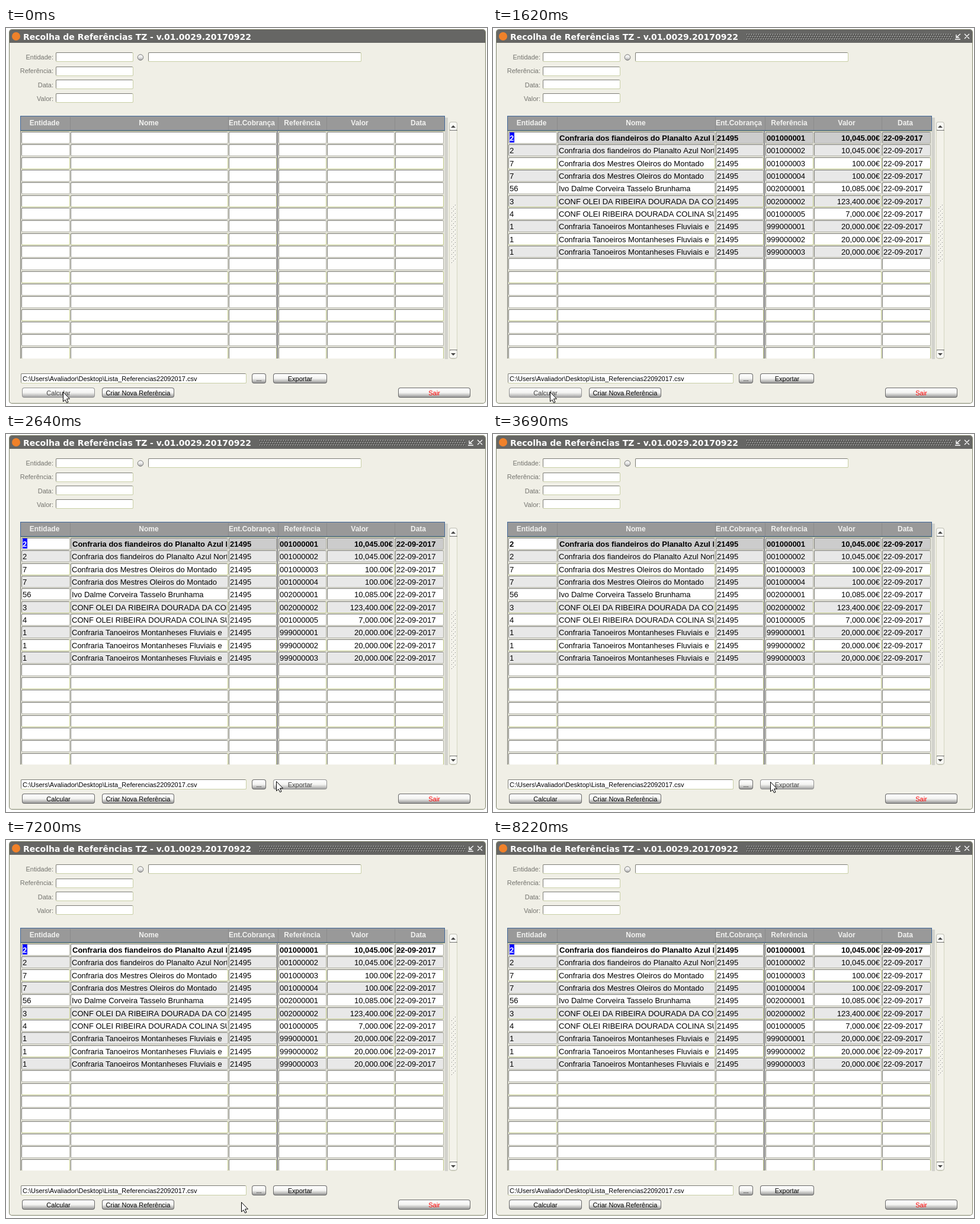
Animation, 812 px wide and 637 px high, one loop 8.5 s. Source, as an HTML page with a canvas:

```html
<!DOCTYPE html>
<html lang="pt">
<head>
<meta charset="utf-8">
<style>
html, body { margin: 0; width: 100%; height: 100%; overflow: hidden; background: #fff; }
canvas { display: block; }
</style>
</head>
<body>
<canvas id="stage" width="812" height="637"></canvas>
<script>
const g = document.getElementById('stage').getContext('2d');
const LOOP = 8500;
const SANS = '"Liberation Sans", Arial, sans-serif';
const SMALL = '11px ' + SANS, CELL = '13px ' + SANS, BOLD = 'bold 13px ' + SANS;
const TITLE = 'bold 14px "DejaVu Sans", Verdana, sans-serif';
const BG = '#f0efe6';

// left, width, heading, heading centre
const cols = [
  [26, 82, 'Entidade', 65], [109, 266, 'Nome', 241], [376, 81, 'Ent.Cobrança', 415],
  [460, 81, 'Referência', 500], [542, 114, 'Valor', 597], [657, 82, 'Data', 696]
];
const weavers = 'Confraria dos fiandeiros do Planalto Azul Norte';
const potters = 'Confraria dos Mestres Oleiros do Montado';
const coopers = 'Confraria Tanoeiros Montanheses Fluviais e';
const rows = [
  ['2', weavers, '001000001', '10,045.00€'],
  ['2', weavers, '001000002', '10,045.00€'],
  ['7', potters, '001000003', '100.00€'],
  ['7', potters, '001000004', '100.00€'],
  ['56', 'Ivo Dalme Corveira Tasselo Brunhama', '002000001', '10,085.00€'],
  ['3', 'CONF OLEI DA RIBEIRA DOURADA DA COLINA', '002000002', '123,400.00€'],
  ['4', 'CONF OLEI RIBEIRA DOURADA COLINA SUL E', '001000005', '7,000.00€'],
  ['1', coopers, '999000001', '20,000.00€'],
  ['1', coopers, '999000002', '20,000.00€'],
  ['1', coopers, '999000003', '20,000.00€']
].map(([id, name, ref, value]) => [id, name, '21495', ref, value, '22-09-2017']);

// start time, x, y of the pointer
const pointer = [
  [0, 96, 613], [2120, 113, 611], [2390, 335, 580], [2640, 456, 585],
  [2910, 468, 584], [3410, 468, 587], [3690, 468, 586], [3960, 468, 590],
  [7200, 397, 610], [7450, 378, 613], [7970, 530, 603], [8220]
];

function rect(x, y, w, h, color) {
  g.fillStyle = color;
  g.fillRect(x, y, w, h);
}

function round(x, y, w, h, r, color) {
  g.fillStyle = color;
  g.beginPath();
  g.roundRect(x, y, w, h, r);
  g.fill();
}

function shade(y, h, ...colors) {
  const fill = g.createLinearGradient(0, y, 0, y + h);
  colors.forEach((c, i) => fill.addColorStop(i / (colors.length - 1), c));
  return fill;
}

function text(s, x, y, font, color = '#000', align = 'left') {
  g.font = font;
  g.fillStyle = color;
  g.textAlign = align;
  g.fillText(s, x, y);
}

function poly(points, fill, stroke) {
  g.beginPath();
  points.forEach(([x, y]) => g.lineTo(x, y));
  g.closePath();
  g.fillStyle = fill;
  g.fill();
  if (stroke) {
    g.strokeStyle = stroke;
    g.stroke();
  }
}

function lines(color, width, ...paths) {
  g.strokeStyle = color;
  g.lineWidth = width;
  g.beginPath();
  for (const [start, ...rest] of paths) {
    g.moveTo(...start);
    rest.forEach(p => g.lineTo(...p));
  }
  g.stroke();
  g.lineWidth = 1;
}

// sunken box: dark top and left edges, pale right and bottom edges
function sunken(x, y, w, h, color, pale) {
  round(x, y, w, h, 2, pale);
  round(x, y, w - 1, h - 1, 2, '#7c7c76');
  round(x + 1, y + 1, w - 2, h - 2, 1, color);
}

function button(x, y, w, label, hover, color = '#000') {
  round(x, y, w, 17, 4, hover ? '#929292' : '#686868');
  round(x + 1, y + 1, w - 2, 15, 3, shade(y, 17, '#fff', '#f4f4f2', hover ? '#989898' : '#8a8a8a'));
  text(label, x + w / 2, y + 13, SMALL, hover ? '#444' : color, 'center');
}

function drawWindow(active) {
  rect(0, 0, 812, 637, '#fff');
  round(5, 2, 805, 631, 5, '#7d8168');
  round(6, 3, 803, 629, 4, BG);
  round(6, 3, 803, 22, [4, 4, 0, 0], '#666664');
  g.fillStyle = '#f0812a';
  g.beginPath();
  g.arc(17, 14, 7, 0, 7);
  g.fill();
  text('Recolha de Referências TZ', 29, 20, TITLE, '#fff');
  text('- v.01.0029.20170922', 243, 20, TITLE, '#fff');
  if (!active) return;
  for (let r = 0; r < 3; r++)
    for (let x = 428 + r % 2 * 2; x < 776; x += 4) {
      rect(x + 1, 11 + r * 4, 1, 1, '#222');
      rect(x, 10 + r * 4, 1, 1, '#eee');
    }
  lines('#fff', 1.3,
    [[789, 10], [782, 16]], [[782, 11], [782, 16], [787, 16]], [[780, 19], [789, 19]],
    [[796, 10], [804, 18]], [[804, 10], [796, 18]]);
}

function drawForm() {
  [['Entidade:', 41, 53], ['Referência:', 65, 76], ['Data:', 87, 100], ['Valor:', 110, 123]].forEach(([s, y, base]) => {
    text(s, 80, base, SMALL, '#74746f', 'right');
    sunken(84, y, 131, 16, '#fff', '#c9cfa6');
  });
  sunken(240, 41, 360, 16, '#fff', '#c9cfa6');
  g.fillStyle = shade(44, 11, '#fff', '#e8e8e8', '#999');
  g.strokeStyle = '#777';
  g.beginPath();
  g.arc(227, 49.5, 4.8, 0, 7);
  g.fill();
  g.stroke();
}

function drawTable(t) {
  const filled = t >= 1620;
  rect(741, 151, 5, 407, '#d2d2cc');
  rect(24, 172, 717, 385, '#e3e3da');
  rect(24, 148, 717, 25, '#3f6699');
  rect(25, 149, 715, 23, '#999');
  for (const [x, , label, mid] of cols) {
    if (x > 26) rect(x - 1, 150, 1, 22, '#8b8b8b');
    text(label, mid, 164, 'bold 12px ' + SANS, '#f2f2f0', 'center');
  }
  rect(24, 173, 717, 1, '#8a9160');
  rect(24, 173, 1, 384, '#77776f');
  rect(457, 173, 2, 384, '#8c8c90');

  g.save();
  g.beginPath();
  g.rect(24, 173, 717, 384);
  g.clip();
  for (let r = 0; r < 18; r++) {
    const y = Math.round(175 + r * 64 / 3);
    cols.forEach(([x, w], c) => {
      let color = '#fff';
      if (filled && r < 10 && r % 2) color = '#e8e8e8';
      if (filled && r === 0 && c && t < 3960) color = '#ccc';
      sunken(x, y, w, 20, color, r % 3 === 2 ? '#c3cb8c' : '#b4b4a8');
      if (!filled || r > 9 || r + c === 0) return;
      g.save();
      g.beginPath();
      g.rect(x + 1, y, w - 3, 20);
      g.clip();
      const font = r ? CELL : BOLD;
      if (c === 4) text(rows[r][c], x + w - 3, y + 15, font, '#000', 'right');
      else text(rows[r][c], x + (r === 0 && c === 1 ? 3 : 2), y + 15, font);
      g.restore();
    });
  }
  g.restore();

  if (t >= 1370) {
    const selected = t < 3690 || t >= 3960;
    if (selected) rect(28, 176, 8, 17, '#00f');
    text('2', 28, 190, BOLD, selected ? '#fff' : '#000');
  }
  if (t >= 3960) rect(659, 185, 13, 1, '#222');
}

function drawScrollbar() {
  round(748, 158, 14, 400, 5, '#d4d6c0');
  round(749, 159, 12, 398, 4, '#f3f2ea');
  for (const y of [158, 542]) {
    round(748, y, 14, 15, 4, '#c0c0b6');
    round(749, y + 1, 12, 13, 3, '#f8f8f4');
  }
  rect(749, 172, 13, 1, '#777');
  rect(749, 542, 13, 1, '#777');
  poly([[751, 168], [755, 164], [759, 168]], '#444');
  poly([[751, 548], [759, 548], [755, 552]], '#444');
  for (let y = 298; y < 392; y += 7)
    for (let i = 0; i < 3; i++) {
      rect(753 + i * 3, y + 7 - i * 3, 1, 1, '#fff');
      rect(752 + i * 3, y + 6 - i * 3, 1, 1, '#777');
    }
}

function drawFooter(t) {
  sunken(25, 582, 381, 17, '#fff', '#c9cfa6');
  text('C:\\Users\\Avaliador\\Desktop\\Lista_Referencias22092017.csv', 28, 595, SMALL);
  button(415, 582, 24, '...');
  button(451, 582, 91, 'Exportar', t >= 2640 && t < 7200);
  button(27, 606, 123, t >= 1370 && t < 1620 ? 'A calcular...' : 'Calcular', t < 2390);
  button(162, 606, 122, 'Criar Nova Referência');
  button(662, 606, 122, 'Sair', false, '#f00');
}

function drawPointer(t) {
  const [, x, y] = pointer.findLast(p => p[0] <= t);
  if (x === undefined) return;
  const shape = [[0, 0], [0, 16], [3.5, 13], [6, 18], [8.5, 17], [6, 11.5], [11, 11.5]];
  poly(shape.map(([dx, dy]) => [x + dx + 0.5, y + dy + 0.5]), '#fff', '#000');
}

function frame(now) {
  const t = now % LOOP;
  drawWindow(t >= 1370);
  drawForm();
  drawTable(t);
  drawScrollbar();
  drawFooter(t);
  drawPointer(t);
  requestAnimationFrame(frame);
}
frame(0);
</script>
</body>
</html>
```
